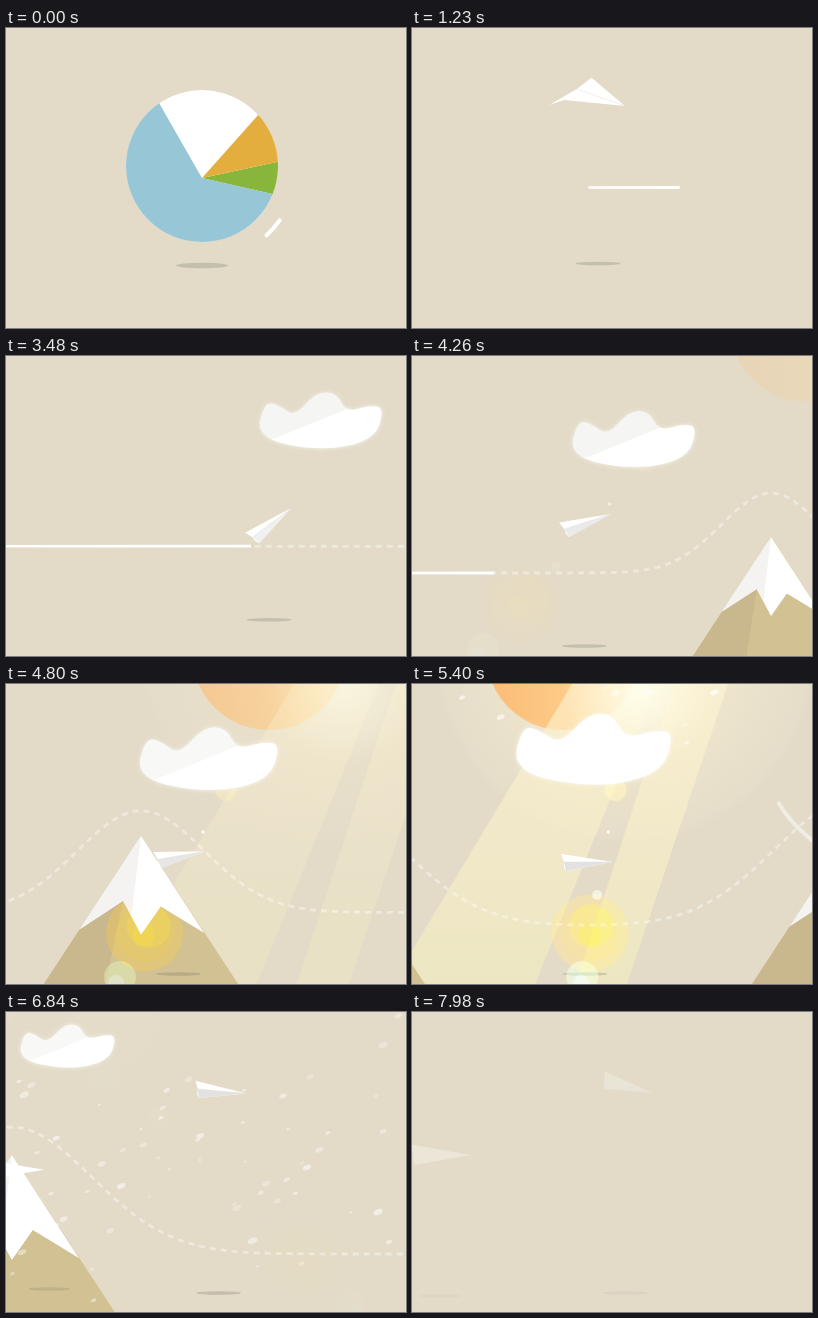
An HTML page with a canvas for the animation above (8.1 s loop, 400 px wide and 300 px high).

```html
<!DOCTYPE html>
<html lang="en">
<head>
<meta charset="utf-8">
<title>Paper plane</title>
<style>
html, body { margin: 0; width: 100%; height: 100%; overflow: hidden; background: #e3dbc8; }
canvas { display: block; width: 400px; height: 300px; }
</style>
</head>
<body>
<canvas id="stage" width="400" height="300"></canvas>
<script>
const ctx = document.getElementById('stage').getContext('2d');
const LOOP = 8100, STEP = 30, LAST = 7980, TAU = Math.PI * 2, DEG = Math.PI / 180;

const clamp = v => Math.max(0, Math.min(1, v));
const lerp = (a, b, u) => a + (b - a) * u;
const span = (t, a, b) => clamp((t - a) / (b - a));
const ease = (t, a, b) => {
  const u = span(t, a, b);
  return u * u * (3 - 2 * u);
};

// Position with speed and acceleration per second, measured at 5.4 s
function drift(t, x, speed, accel = 0) {
  const s = (t - 5400) / 1000;
  return x + speed * s + accel * s * s;
}

// Each key is [time, value, value, ...].
function track(t, keys, curve = ease) {
  const i = Math.max(1, keys.findIndex(k => t <= k[0]));
  const [a, b] = t > keys.at(-1)[0] ? keys.slice(-2) : [keys[i - 1], keys[i]];
  const u = curve(t, a[0], b[0]);
  return a.slice(1).map((v, k) => lerp(v, b[k + 1], u));
}

function fill(points, color) {
  ctx.beginPath();
  points.forEach(p => ctx.lineTo(...p));
  ctx.closePath();
  ctx.fillStyle = color;
  ctx.fill();
}

function disc(x, y, r, color, ry = r, turn = 0) {
  ctx.beginPath();
  ctx.ellipse(x, y, r, ry, turn, 0, TAU);
  ctx.fillStyle = color;
  ctx.fill();
}

function stroke(color, width, dash = []) {
  ctx.strokeStyle = color;
  ctx.lineWidth = width;
  ctx.setLineDash(dash);
  ctx.stroke();
  ctx.setLineDash([]);
}

function layer(alpha, draw) {
  if (alpha <= 0) return;
  ctx.save();
  ctx.globalAlpha *= alpha;
  draw();
  ctx.restore();
}

function placed(x, y, scale, draw) {
  ctx.save();
  ctx.translate(x, y);
  ctx.scale(scale, scale);
  draw();
  ctx.restore();
}

// Pie and its ring
function drawPie(t) {
  const left = 1 - ease(t, 60, 840);
  const slices = [['#97c7d7', 227.5], ['#88b63d', 24.7], ['#e3ae3d', 36.3]];
  ctx.save();
  ctx.beginPath();
  ctx.arc(196, 138, 76, 0, TAU);
  ctx.clip();
  ctx.fillStyle = '#fff';
  ctx.fill();
  let end = 240.2;
  for (const [color, size] of slices) {
    const from = end - size * left;
    ctx.beginPath();
    ctx.moveTo(196, 150);
    ctx.arc(196, 150, 200, from * DEG, end * DEG);
    ctx.fillStyle = color;
    ctx.fill();
    end = from;
  }
  ctx.restore();
  const head = lerp(35, -115, ease(t, 0, 660));
  const tail = 47 + 48 * ease(t, 0, 300) - 210 * ease(t, 300, 840);
  if (tail <= head) return;
  ctx.beginPath();
  ctx.arc(196, 138, 94.8, head * DEG, tail * DEG);
  ctx.lineCap = 'round';
  stroke('#fff', 4);
  ctx.lineCap = 'butt';
}

// Nose position and heading in degrees along the flight
const flight = t => track(t, [
  [1230, 213, 78, 16], [2730, 367, 146, -55], [4260, 199, 158, -18],
  [5400, 201, 178, 0], [6090, 241, 82, -5], [7600, 240, 81, 16]
]);

// Outline from the nose round the lower tail; open unfolds the wings
function planeShape(x, y, heading, open = 0, size = 1) {
  const c = Math.cos(heading * DEG) * size, s = Math.sin(heading * DEG) * size;
  return [
    [0, 0], [-47 - 13 * open, 9 + 2 * open], [-49 - 24 * open, 5 + 15 * open],
    [-49 - 2 * open, -3 * open], [-52 + 12 * open, -8 - 10 * open]
  ].map(([u, v]) => [x + u * c - v * s, y + u * s + v * c]);
}

function along(points, u) {
  const f = u * points.length, i = Math.floor(f);
  const a = points[i], b = points[(i + 1) % points.length];
  return [lerp(a[0], b[0], f % 1), lerp(a[1], b[1], f % 1)];
}

function drawPlane(t) {
  const p = planeShape(...flight(t), 1 - ease(t, 1230, 2300));
  if (t < 1200) {
    const u = ease(t, 870, 1200);
    fill(Array.from({ length: 60 }, (_, i) => {
      const a = i / 60 * TAU, [x, y] = along(p, i / 60);
      return [lerp(196 + 76 * Math.cos(a), x, u), lerp(138 + 76 * Math.sin(a), y, u)];
    }), '#fff');
    return;
  }
  fill(p, '#fff');
  const shade = .3 * span(t, 1800, 2700) + .7 * span(t, 2700, 5400);
  layer(shade, () => fill([p[0], p[1], p[3]], '#e3e2e1'));
  ctx.beginPath();
  ctx.moveTo(...p[0]);
  ctx.lineTo(...p[3]);
  stroke('rgba(215,212,206,.35)', 1);
}

function drawSecondPlane(t) {
  const u = ease(t, 5900, 7600);
  fill(planeShape(lerp(9, 59, u), lerp(178, 143, u), 1, 0, 1.18), '#fff');
}

function drawShadows(t) {
  const [x, , heading] = flight(t), u = ease(t, 870, 1230);
  const color = 'rgba(105,103,94,.25)';
  const y = 237.5 - 2 * u + 3.5 * ease(t, 1230, 2730) + 51 * ease(t, 2730, 4260) - 9 * ease(t, 5400, 6090);
  disc(lerp(196, x - 28 * Math.cos(heading * DEG), u), y, 26 - 3.5 * u, color, 2.7 - u);
  const v = ease(t, 6090, 7600);
  layer(span(t, 5850, 6060) * .7, () => disc(lerp(58, 28, v), lerp(270, 284, v), 21, color, 1.8));
}

// Streak that spreads, lifts into a swoosh and then retreats to the left
const retreat = t => 82 - .209 * (t - 4260);

function drawStreak(t) {
  if (t < 1020) return;
  const u = ease(t, 1020, 1740), lead = 60 * (ease(t, 1800, 2700) - ease(t, 2760, 3150));
  const l = 222 * (1 - u) + lead, r = Math.min(222 * (1 + u), retreat(t));
  if (r <= l) return;
  const y = 159.5 + 5.5 * ease(t, 1800, 2730) + 52 * ease(t, 2730, 4260);
  const lift = ease(t, 2100, 2730) * (1 - ease(t, 2800, 3500));
  const g = ctx.createLinearGradient(l, 0, r, 0);
  g.addColorStop(.15, '#fff');
  g.addColorStop(.55, `rgba(255,255,255,${1 - .62 * lift})`);
  g.addColorStop(1, `rgba(255,255,255,${1 - .68 * lift})`);
  const end = y - 14 * lift, w = 1.4 + 3 * lift;
  fill([[l, y - 1.3], [r, end - w], [r, end + w], [l, y + 1.3]], g);
  if (lead > 0) {
    ctx.beginPath();
    ctx.moveTo(0, y);
    ctx.lineTo(l, y);
    stroke('rgba(255,255,255,.4)', 2.5, [7, 5]);
  }
}

// Mountains and the dashed route that rises over them
const GAP = 533;
const peakX = t => drift(t, -90, -354, 35);

function drawRoute(t) {
  if (t < 2750) return;
  const grow = ease(t, 4260, 5400), first = peakX(t);
  const base = 165 + 52 * ease(t, 2730, 4260) + 25 * grow;
  const bump = d => Math.exp(-((d / (70 + 43 * grow)) ** 2));
  layer(1 - span(t, 6900, 7500), () => {
    ctx.beginPath();
    for (let x = Math.max(0, retreat(t)); x <= 404; x += 4) {
      ctx.lineTo(x, base - (80 + 47 * grow) * (bump(x - first) + bump(x - first - GAP)));
    }
    ctx.lineDashOffset = -first;
    stroke('rgba(255,255,255,.38)', 2.8, [6, 5]);
  });
  layer(span(t, 5100, 5350) * (1 - span(t, 5450, 5700)), () => {
    const x = first + 456;
    ctx.beginPath();
    ctx.moveTo(x, 118);
    ctx.quadraticCurveTo(x + 12, 139, x + 36, 158);
    stroke('rgba(255,255,255,.5)', 4);
  });
}

function drawMountains(t) {
  if (t < 3300) return;
  const grow = ease(t, 3300, 5200), snow = lerp(.5, 1, grow);
  for (const x of [peakX(t), peakX(t) + GAP]) {
    placed(x, lerp(220, 143, grow), 1, () => {
      fill([[0, 0], [-118, 180], [118, 180]], '#d2c193');
      fill([[0, 0], [-118, 180], [-45 * snow, 180], [-19 * snow, 69 * snow]], '#c9b88d');
      ctx.scale(snow, snow);
      fill([[0, 0], [-65, 99], [-19, 69], [0, 105], [21, 75], [67, 103]], '#fff');
      fill([[0, 0], [-65, 99], [-19, 69], [-10, 84]], '#f4f3f1');
    });
  }
}

// Closed curve through the middles of the given corners
function blob(corners) {
  const mid = i => {
    const a = corners[i % corners.length], b = corners[(i + 1) % corners.length];
    return [(a[0] + b[0]) / 2, (a[1] + b[1]) / 2];
  };
  ctx.beginPath();
  ctx.moveTo(...mid(0));
  for (let i = 1; i <= corners.length; i++) ctx.quadraticCurveTo(...corners[i % corners.length], ...mid(i));
}

function drawCloud(x, y, size, shade) {
  placed(x, y, size, () => {
    blob([[-64, 18], [-56, -18], [-42, -15], [-26, -3], [-4, -28], [16, -27],
      [25, -8], [50, -15], [64, -12], [54, 20], [0, 31]]);
    ctx.fillStyle = '#fff';
    ctx.shadowColor = 'rgba(255,255,255,.7)';
    ctx.shadowBlur = 4;
    ctx.fill();
    ctx.shadowBlur = 0;
    ctx.clip();
    layer(shade, () => fill([[-70, 22], [-45, 18], [28, -12], [10, -40], [-70, -40]], '#f5f5f4'));
  });
}

function drawClouds(t) {
  const near = track(t, [
    [2550, 490, 29, 1], [4260, 221.5, 83, 1], [5400, 181, 65, 1.27], [6090, -10, 73, .8], [6400, -90, 73, .8]
  ], (s, a, b) => a < 3000 ? 1 - (1 - span(s, a, b)) ** 1.35 : span(s, a, b));
  drawCloud(...near, 1 - span(t, 4600, 5300));
  drawCloud(drift(t, 571, -354), 34, .77, .7);
}

// Sun, beams and lens flare
function drawSun(t) {
  if (t < 3600 || t > 7000) return;
  const x = drift(t, 151, -156, 51), y = -31 - 120 * ease(t, 6200, 7000);
  const glow = span(t, 4300, 5300) * (1 - .4 * span(t, 5400, 6090)) * (1 - span(t, 6100, 6900));
  layer(glow, () => {
    const g = ctx.createRadialGradient(x + 62, y, 20, x + 62, y, 190);
    g.addColorStop(0, 'rgba(255,252,228,1)');
    g.addColorStop(.5, 'rgba(255,244,212,.4)');
    g.addColorStop(.96, 'rgba(248,238,210,.14)');
    g.addColorStop(1, 'rgba(248,238,210,0)');
    disc(x + 62, y, 190, g);
  });
  layer(lerp(.22, 1, span(t, 4260, 5200)), () => {
    const g = ctx.createLinearGradient(x - 70, 0, x + 70, 0);
    g.addColorStop(0, '#fbbd78');
    g.addColorStop(1, '#fed896');
    disc(x, y, 77, g);
  });
  layer(span(t, 4300, 5300) * (1 - span(t, 6100, 6900)), () => {
    const b = drift(t, 262, -213), g = ctx.createLinearGradient(0, 0, 0, 300);
    g.addColorStop(0, 'rgba(255,244,212,.6)');
    g.addColorStop(1, 'rgba(244,238,190,.6)');
    fill([[b - 102, 0], [b - 17, 0], [b - 139, 300], [b - 282, 300]], g);
    fill([[b, 0], [b + 54, 0], [b - 47, 300], [b - 99, 300]], g);
  });
  layer(glow, () => {
    const g = ctx.createRadialGradient(x + 75, 8, 0, x + 75, 8, 75);
    g.addColorStop(0, 'rgba(255,254,236,.9)');
    g.addColorStop(1, 'rgba(255,250,225,0)');
    disc(x + 75, 8, 75, g);
  });
}

function drawFlare(t) {
  const power = (.16 * span(t, 3900, 4260) + .84 * span(t, 4260, 5300)) * (1 - span(t, 6090, 6900));
  const sway = drift(t, -18, 71, 9), at = k => 196 + sway * k;
  layer(power, () => {
    ctx.globalCompositeOperation = 'overlay';
    disc(at(1), 249, 38.5, 'rgba(255,160,40,.55)');
    disc(at(1), 249, 29, 'rgba(255,165,50,.25)');
    disc(at(.93), 242, 22, 'rgba(255,210,60,.4)');
    disc(at(1.02), 251, 11, 'rgba(255,175,70,.45)');
    disc(at(1.43), 293, 16, 'rgba(190,255,190,.65)');
    disc(at(1.5), 299, 8, 'rgba(200,225,255,.6)');
    disc(at(-.42), 106, 11, 'rgba(255,200,110,.75)');
    disc(at(.6), 211, 5, 'rgba(220,255,220,.7)');
  });
  layer(power * span(t, 5500, 6000), () => disc(at(-.95), 62, 17, 'rgba(232,234,228,.6)'));
  layer(clamp(power * 4), () => disc(at(-.02), 148, 1.7, 'rgba(255,255,255,.9)'));
}

function makeRandom(seed) {
  return () => (seed = (seed * 16807) % 2147483647) / 2147483647;
}

function drawSnow(t) {
  if (t < 4900 || t > 7400) return;
  const rnd = makeRandom(77), age = (t - 4900) / 1000;
  for (let i = 0; i < 70; i++) {
    const x = ((rnd() * 520 - age * 130) % 520 + 520) % 520 - 40;
    const y = -20 - rnd() * 200 + age * (110 + rnd() * 70);
    const r = 1.2 + rnd() * 2.4;
    layer((.3 + rnd() * .4) * (1 - span(t, 6700, 7400)), () => disc(x, y, r * 1.4, '#fff', r * .8, -.4));
  }
}

function draw(t) {
  ctx.fillStyle = '#e3dbc8';
  ctx.fillRect(0, 0, 400, 300);
  const stay = 1 - span(t, 7600, LAST);
  drawSun(t);
  drawStreak(t);
  drawRoute(t);
  drawMountains(t);
  layer(lerp(.25, 1, stay), () => drawShadows(t));
  drawClouds(t);
  drawFlare(t);
  drawSnow(t);
  if (t < 870) drawPie(t);
  else layer(lerp(.24, 1, stay), () => drawPlane(t));
  if (t > 5900) layer(lerp(.3, 1, stay), () => drawSecondPlane(t));
}

const start = performance.now();
function tick() {
  const t = (performance.now() - start) % LOOP;
  draw(Math.min(LAST, Math.floor(t / STEP) * STEP));
  requestAnimationFrame(tick);
}
tick();
</script>
</body>
</html>
```
